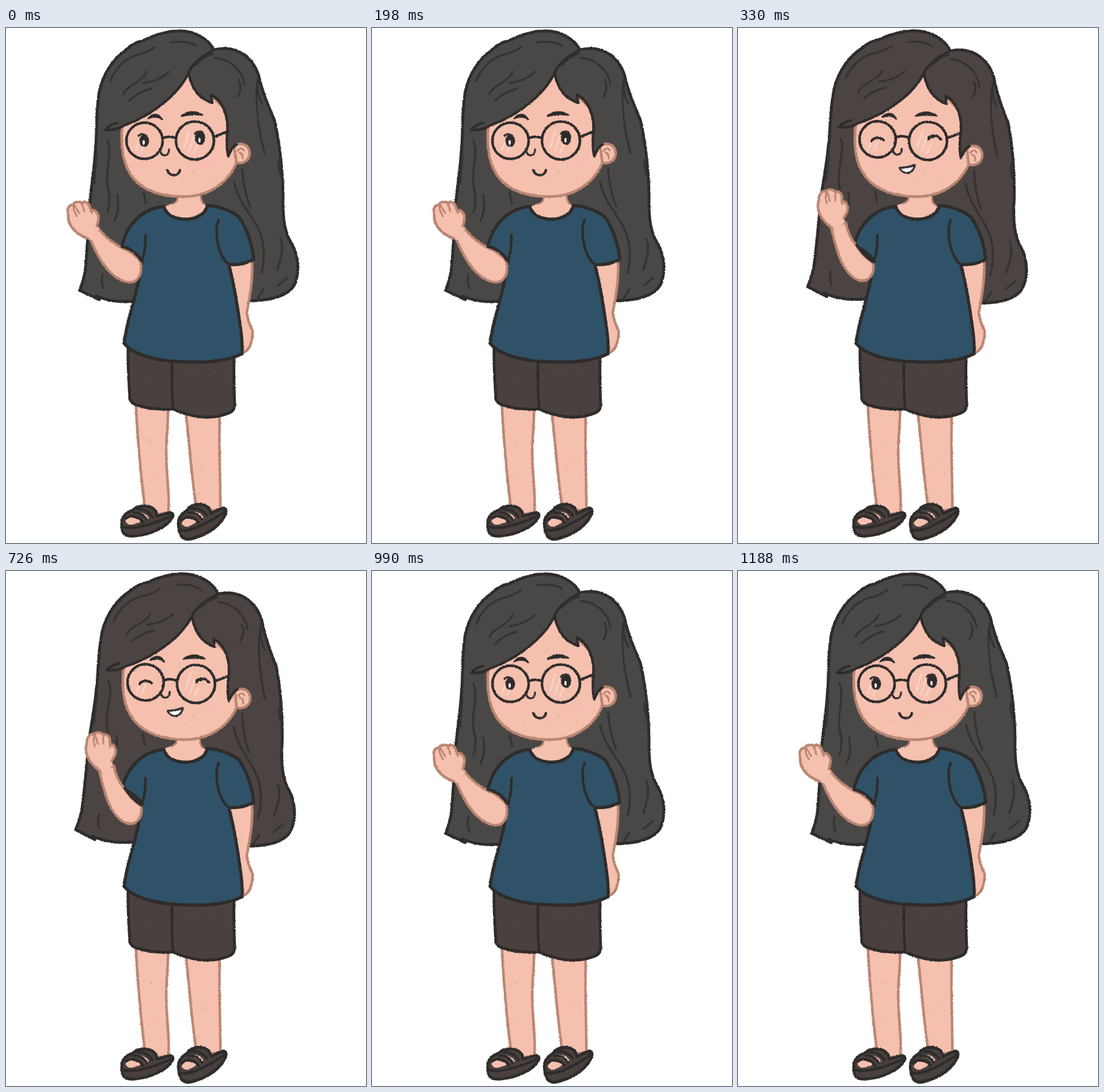
Recreate the animation shown at these times as an HTML page. Size 625 by 895 pixels, loop 1.32 s.

```html
<!DOCTYPE html>
<html lang="en">
<head>
<meta charset="utf-8">
<title>Waving girl</title>
<style>
  html, body { margin: 0; width: 100%; height: 100%; overflow: hidden; background: #fff; }
  svg { display: block; width: 100%; height: 100%; }
  path, circle, ellipse { stroke-linecap: round; stroke-linejoin: round; }
  .ink { stroke: #2e2c2b; stroke-width: 5; }
  .line { fill: none; stroke: #2e2c2b; stroke-width: 4.5; }
  .thin { fill: none; stroke: #353232; stroke-width: 3.5; }
  .brow { fill: #2e2c2b; stroke: #2e2c2b; stroke-width: 3; }
  .skin { fill: #f6c0af; stroke: #b98673; stroke-width: 4.5; }
  .bare { fill: #f6c0af; }
  .crease { fill: none; stroke: #b98673; stroke-width: 3; }
  .hair { fill: #4a4846; }
  .laugh .hair { fill: #4b4443; }
  .shirt { fill: #2f5268; stroke-width: 5.5; }
  .shorts { fill: #4a413e; }
  .glare { fill: none; stroke: #fff; stroke-opacity: .3; stroke-width: 3; }
  .cheek { fill: #f7b5b8; opacity: .3; }
  .laugh .calm-only, svg:not(.laugh) .laugh-only { display: none; }
</style>
</head>
<body>
<svg id="stage" viewBox="0 0 625 895">
  <defs>
    <filter id="crayon" x="0" y="0" width="625" height="895" filterUnits="userSpaceOnUse" color-interpolation-filters="sRGB">
      <feTurbulence type="fractalNoise" baseFrequency=".4" numOctaves="2" seed="4"/>
      <feDisplacementMap in="SourceGraphic" scale="2.800" xChannelSelector="R" yChannelSelector="G"/>
    </filter>
    <filter id="soft"><feGaussianBlur stdDeviation="4"/></filter>
    <g id="sandal">
      <path class="ink shorts" d="M201 861C199 879 208 884 222 883C250 881 282 867 290 848C290 840 283 842 276 844L262 848C262 839 255 832 244 831Q229 829 220 838C208 842 200 850 201 861Z"/>
      <path class="bare" d="M208 859C206 850 218 847 235 857Q224 864 213 863Z"/>
      <path class="bare" d="M223 844Q236 845 242 856L248 852Q243 842 227 841Z"/>
      <path class="line" d="M208 852C216 846 230 848 238 859M222 842Q237 842 244 855M228 836Q246 836 254 850M204 867C222 873 262 860 287 848"/>
    </g>
  </defs>

  <g filter="url(#crayon)">
    <g id="head">
      <path class="ink hair" d="M361 38C351 18 325 4 298 5C276 6 253 14 238 22Q222 25 208 38C180 58 163 90 160 125C156 160 158 190 155 215C153 250 147 280 145 310C143 350 140 400 137 425Q133 443 128 456Q144 464 162 472L157 466C180 476 205 477 228 474L428 474C460 473 487 466 499 449C511 428 508 397 497 377C483 355 480 330 481 290C480 240 475 200 466 160C455 135 445 110 440 88C432 54 402 27 361 38Z"/>
      <path class="thin" d="M176 196C187 220 168 250 179 288Q181 306 176 320M193 290Q198 318 188 335M239 286L243 305M168 428Q164 440 169 452M157 220Q155 245 153 270"/>
      <path class="thin" d="M396 268C405 312 441 335 446 375Q450 397 444 425M410 245Q413 285 424 310M437 90C430 130 440 185 449 218M477 224C470 235 474 246 477 256M476 366C484 382 475 408 471 420M472 448L488 434M437 470L447 454"/>

      <path class="bare" d="M299 280L298 301L274 311C280 342 345 342 350 310Q337 304 337 280Z"/>
      <path class="crease" d="M298 296Q297 303 289 306M338 292Q338 302 344 306"/>
      <path class="skin" d="M394 207C408 195 424 204 423 219C422 232 409 238 396 233Z"/>
      <path class="crease" d="M402 214Q408 205 413 213M405 216Q412 219 411 227"/>
      <path class="skin" d="M317 80C270 115 230 150 202 169C198 207 203 239 222 262C241 285 277 294 311 293C352 292 385 270 400 234L388 150L340 100Z"/>
      <g filter="url(#soft)">
        <ellipse class="cheek" cx="238" cy="241" rx="17" ry="9"/>
        <ellipse class="cheek" cx="355" cy="238" rx="17" ry="10"/>
      </g>

      <path class="hair" d="M361 38C300 0 240 35 215 55L167 120L172 177Q190 179 206 169C250 153 298 118 317 78C322 105 335 123 358 130L356 116C379 128 387 157 384 186Q382 207 386 223Q391 206 402 198L438 190L430 85Q410 40 361 38Z"/>
      <path class="line" d="M172 177Q190 179 206 169C250 153 298 118 317 78C322 105 335 123 358 130L356 116C379 128 387 157 384 186Q382 207 386 223Q391 209 400 202M317 78Q324 58 361 38M172 177Q183 166 193 165"/>
      <path class="thin" d="M181 92C192 65 211 50 234 45Q250 40 259 33M204 115C210 98 238 94 244 76M214 126Q228 112 252 105M239 96Q268 91 283 76M287 25Q314 21 330 31M330 64Q345 48 359 45M362 52C389 54 410 73 414 98M404 90Q411 105 402 119M437 92Q435 114 445 132"/>

      <path class="brow" d="M247 157Q262 143 271 159Q263 151 247 157ZM305 153Q321 140 341 151Q321 149 305 153Z"/>
      <path class="glare" d="M226 211L233 194M235 215L241 200M310 207L318 179M318 213L326 188M327 216L333 202"/>
      <g class="line">
        <circle cx="240.500" cy="196" r="31.500"/>
        <circle cx="328" cy="195.500" r="33"/>
        <path d="M273 191Q284 187 294 191M362 189L384 180"/>
      </g>
      <path class="thin" d="M268 215C270 224 283 224 283 211"/>
      <g class="calm-only">
        <ellipse cx="240" cy="196" rx="8.500" ry="11" fill="#2e2c2b"/>
        <ellipse cx="337" cy="191" rx="9" ry="12" fill="#2e2c2b"/>
        <path class="thin" d="M230 187Q236 182 243 187M328 184Q333 178 341 181"/>
        <ellipse cx="239" cy="199" rx="2" ry="4" fill="#fff"/>
        <ellipse cx="336" cy="195" rx="2" ry="4" fill="#fff"/>
        <path class="line" d="M280 247C284 258 299 259 302 247"/>
      </g>
    </g>

    <g class="laugh-only">
      <path class="line" d="M232 196C236 189 248 190 253 195M331 193C336 184 348 186 352 194M331 190L341 188"/>
      <path class="thin" style="fill:#fff" d="M280 243Q294 243 307 238C304 255 287 256 280 243Z"/>
    </g>

    <path class="skin" d="M225 645C228 710 233 775 243 847L282 843C285 800 274 760 280 700L282 655Z"/>
    <path class="skin" d="M312 665C318 720 322 780 331 838L372 838C373 790 369 740 371 668Z"/>
    <use href="#sandal"/>
    <use href="#sandal" transform="translate(341 857) rotate(-8) scale(.96 1.1) translate(-245 -858)"/>

    <path class="skin" d="M386 408C396 445 400 480 403 505L410 565C422 562 429 545 428 526Q419 507 418 495C425 460 429 430 427 404Z"/>
    <path class="ink shorts" d="M212 555C211 590 214 620 215 646Q219 652 226 655C246 661 268 664 290 662C310 672 338 678 358 676Q378 674 391 667Q398 662 397 652Q395 620 396 570Z"/>
    <path class="line" d="M288 580Q287 622 290 662"/>
    <path class="ink shirt" d="M274 310C280 339 342 341 350 308C374 311 393 319 405 329C419 350 428 378 430 402Q410 413 387 411C394 440 400 470 404 500Q411 542 410 566C384 579 345 582 310 580C270 580 222 570 205 548C209 510 224 475 230 440L236 404C225 390 215 382 201 380C211 338 238 314 274 310Z"/>
    <path class="line" d="M369 334C360 360 371 400 387 411M242 360Q243 382 236 407"/>

    <g class="calm-only">
      <path class="skin" d="M157 344C170 362 185 374 203 383Q222 390 234 407C237 429 229 446 208 441C178 433 159 398 146 366Z"/>
      <path class="line" d="M201 380Q222 384 235 405"/>
    </g>
    <g class="laugh-only">
      <path class="skin" d="M187 338C190 355 198 370 207 380C216 397 228 402 235 409C237 430 227 443 208 438C180 424 172 389 162 348Z"/>
      <path class="line" d="M206 377Q218 396 235 407"/>
    </g>
    <g id="hand">
      <path class="skin" d="M147 367C126 362 107 346 108 326C105 314 109 308 116 307C119 301 128 301 132 304C140 299 146 307 147 317C156 314 163 325 160 336Q156 346 158 353Z"/>
      <path class="crease" d="M117 308Q117 319 123 327M132 305L136 319M147 317L149 322M118 307L127 322"/>
      <path d="M148 364L157 350" stroke="#f6c0af" stroke-width="8"/>
    </g>
    <g id="specks" fill="#a56f5c"></g>
  </g>
</svg>
<script>
  const LOOP = 1320, LAUGH_START = 330, LAUGH_END = 990;
  const stage = document.getElementById("stage");
  const head = document.getElementById("head");
  const hand = document.getElementById("hand");
  const specks = document.getElementById("specks");

  let seed = 7;
  const random = () => (seed = seed * 16807 % 2147483647) / 2147483647;

  function sprinkle(count, x, y, width, height) {
    for (let i = 0; i < count; i++) {
      const dot = document.createElementNS("http://www.w3.org/2000/svg", "circle");
      dot.setAttribute("cx", x + random() * width);
      dot.setAttribute("cy", y + random() * height);
      dot.setAttribute("r", 0.4 + random() * 0.4);
      specks.append(dot);
    }
  }
  sprinkle(10, 235, 235, 130, 35);
  sprinkle(8, 237, 675, 34, 140);
  sprinkle(8, 328, 690, 36, 130);
  sprinkle(6, 240, 590, 140, 65);

  function draw(now) {
    const time = now % LOOP;
    const laughing = time >= LAUGH_START && time < LAUGH_END;
    stage.classList.toggle("laugh", laughing);
    head.setAttribute("transform", laughing ? "rotate(2 310 250)" : "");
    hand.setAttribute("transform", laughing ? "translate(29 -20) rotate(15 133 335)" : "");
  }

  const start = performance.now();
  function tick() {
    draw(performance.now() - start);
    requestAnimationFrame(tick);
  }
  tick();
</script>
</body>
</html>
```
